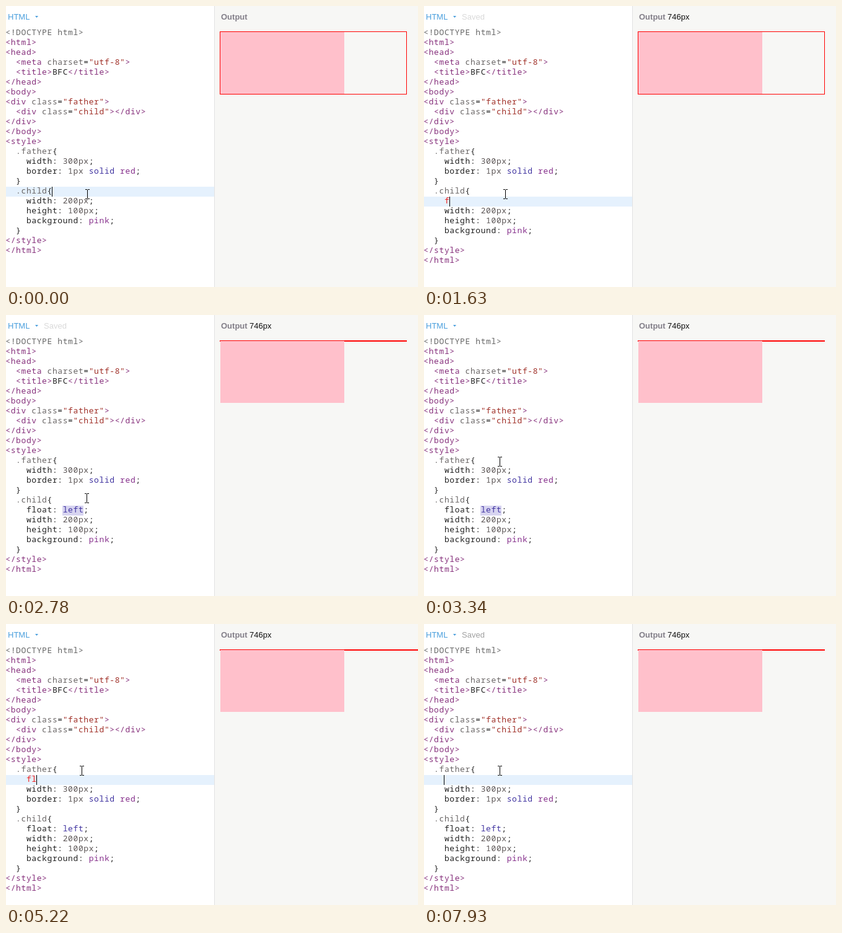
Recreate the animation shown at these times as an HTML page with a canvas. Size 665x454 px, loop 8 s.

```html
<!DOCTYPE html>
<html>
<head>
<meta charset="utf-8">
<style>
html, body { margin: 0; width: 100%; height: 100%; overflow: hidden; background: #fff; }
canvas { display: block; }
</style>
</head>
<body>
<canvas width="665" height="454"></canvas>
<script>
const ctx = document.querySelector('canvas').getContext('2d');
const LOOP = 8000, COL = 8.4, ROW = 16, LEFT = -1, TOP = 36;
const UI = '13px "Liberation Sans", Arial, sans-serif';
const CODE = '300 13px "Noto Sans Mono", monospace';
const RED = '#f00', PINK = '#ffc0cb', PANEL = '#f7f7f5';

// Space the letters so that each one fills exactly one column.
ctx.font = CODE;
const GAP = COL - ctx.measureText('0').width;

const HEAD = `<!DOCTYPE html>
<html>
<head>
  <meta charset="utf-8">
  <title>BFC</title>
</head>
<body>
<div class="father">
  <div class="child"></div>
</div>
</body>
<style>`.split('\n');
const TAIL = ['</st' + 'yle>', '</html>'];

const TOKENS = [
  [/<!.*>/y, '#666'],
  [/<\/?\w+|>/y, '#86307c'],
  [/"[^"]*"/y, '#a03028'],
  [/class|charset|\.\w+/y, '#6a6666'],
  [/\d+px/y, '#5c5656'],
  [/solid|left/y, '#4034a0'],
  [/red|pink/y, '#86308c'],
  [/\w+|[^\w<>"]/y, '#222']
];

// Each entry changes part of the state from its time on.
// caret: [row, column]; father/child: the line typed into that rule.
const EVENTS = [
  [0, { caret: [16, 9], blink: true, line: 16, father: null, child: null, ink: '#f02020', sel: null,
        saved: 0, size: false, box: 'normal', mouse: 'beam', x: 131, y: 304 }],
  [480, { blink: false }],
  [710, { child: '', caret: [17, 4], blink: true, line: 17 }],
  [1020, { size: true }],
  [1250, { blink: false }],
  [1400, { child: 'f', caret: [17, 5], blink: true }],
  [1630, { saved: .4 }],
  [1710, { child: 'fl', caret: [17, 6], saved: 0, box: 'full' }],
  [1860, { child: 'float: left;', sel: 17, line: null, blink: false }],
  [1940, { mouse: '' }],
  [2090, { mouse: 'arrow' }],
  [2170, { mouse: 'beam', box: 'flat' }],
  [2780, { saved: .4 }],
  [2860, { saved: 1 }],
  [3260, { saved: .4 }],
  [3340, { saved: 0, x: 122, y: 237 }],
  [3500, { sel: null, line: 12, caret: [12, 10], blink: true }],
  [4030, { blink: false }],
  [4200, { father: '', caret: [13, 4], blink: true, line: 13 }],
  [4280, { size: false }],
  [4350, { mouse: '' }],
  [4500, { mouse: 'arrow', size: true }],
  [4580, { mouse: 'beam' }],
  [4730, { father: 'f', caret: [13, 5] }],
  [4900, { father: 'fl', caret: [13, 6] }],
  [4970, { box: 'wide' }],
  [5150, { saved: .4 }],
  [5220, { saved: 0 }],
  [5290, { father: 'float: left;', sel: 13, line: null, blink: false, saved: 1 }],
  [5520, { box: 'normal' }],
  [6530, { father: 'fl', ink: '#50c850', sel: null, line: 13, blink: true, saved: 0 }],
  [6760, { box: 'wide' }],
  [6910, { father: '', caret: [13, 4] }],
  [7080, { box: 'flat' }],
  [7400, { blink: false }],
  [7860, { blink: true, saved: .4 }],
  [7930, { saved: 1 }]
];

function stateAt(t) {
  const s = Object.assign({}, ...EVENTS.filter(e => e[0] <= t).map(e => e[1]));
  if (t >= 2780 && t < 3340) {
    const k = (Math.floor((t - 2780) / 80) + 1) / 8;
    s.x = Math.round(131 - 9 * k);
    s.y = Math.round(304 - 67 * k);
  }
  return s;
}

function rect(x, y, w, h, color) {
  ctx.fillStyle = color;
  ctx.fillRect(x, y, w, h);
}

function text(str, x, y, color, font, gap = 0) {
  ctx.font = font;
  ctx.letterSpacing = gap + 'px';
  ctx.fillStyle = color;
  ctx.fillText(str, x, y);
}

const colX = col => LEFT + col * COL;
const rowY = row => TOP + row * ROW;

function rule(name, typed, props) {
  const lines = typed === null ? props : [typed, ...props];
  return [`  .${name}{`, ...lines.map(p => '    ' + p), '  }'];
}

function drawLine(str, row, ink) {
  const typing = /^ +fl?$/.test(str);
  for (let i = 0; i < str.length;) {
    for (const [re, color] of TOKENS) {
      re.lastIndex = i;
      const m = re.exec(str);
      if (!m) continue;
      text(m[0], colX(i) + GAP / 2, rowY(row) + 11, typing ? ink : color, CODE, GAP);
      i += m[0].length;
      break;
    }
  }
}

function drawEditor(s) {
  if (s.line) rect(0, rowY(s.line), 336, ROW, '#e5f1fd');
  if (s.sel) rect(91, rowY(s.sel), 34, ROW, '#d7d4f0');
  [
    ...HEAD,
    ...rule('father', s.father, ['width: 300px;', 'border: 1px solid red;']),
    ...rule('child', s.child, ['width: 200px;', 'height: 100px;', 'background: pink;']),
    ...TAIL
  ].forEach((str, row) => drawLine(str, row, s.ink));
  if (s.blink) rect(Math.floor(colX(s.caret[1])), rowY(s.caret[0]), 1, ROW, '#000');

  text('HTML', 3, 22, '#4a9fdd', UI);
  ctx.beginPath();
  ctx.moveTo(47, 16);
  ctx.lineTo(52, 16);
  ctx.lineTo(49.5, 19);
  ctx.fill();
  if (s.saved) text('Saved', 61, 22, `rgba(160,160,160,${s.saved})`, UI);
}

function drawOutput(s) {
  rect(336, 0, 329, 454, PANEL);
  rect(336, 0, 1, 454, '#e2e2e2');
  text('Output', 347, 22, '#837f89', 'bold ' + UI);
  if (s.size) text('746px', 393, 22, '#111', UI);

  const open = s.box === 'normal' || s.box === 'full';
  rect(345, 41, s.box === 'wide' ? 320 : 302, open ? 102 : 2, RED);
  if (open) rect(346, 42, 300, 100, PANEL);
  rect(346, 42, s.box === 'full' ? 300 : 200, 100, PINK);
}

const ARROW = new Path2D('M0 0V16L3.5 12.5L6 18H8.5L6 12H11Z');

function drawMouse({ mouse, x, y }) {
  if (mouse === 'beam') {
    for (const dy of [-8, 7]) {
      rect(x - 3, y + dy, 3, 1, '#000');
      rect(x + 1, y + dy, 3, 1, '#000');
    }
    rect(x, y - 7, 1, 14, '#000');
  } else if (mouse === 'arrow') {
    ctx.save();
    ctx.translate(x - .5, y - .5);
    ctx.fillStyle = '#fff';
    ctx.fill(ARROW);
    ctx.stroke(ARROW);
    ctx.restore();
  }
}

function frame(now) {
  const s = stateAt(now % LOOP);
  rect(0, 0, 665, 454, '#fff');
  drawEditor(s);
  drawOutput(s);
  drawMouse(s);
  requestAnimationFrame(frame);
}
requestAnimationFrame(frame);
</script>
</body>
</html>
```
